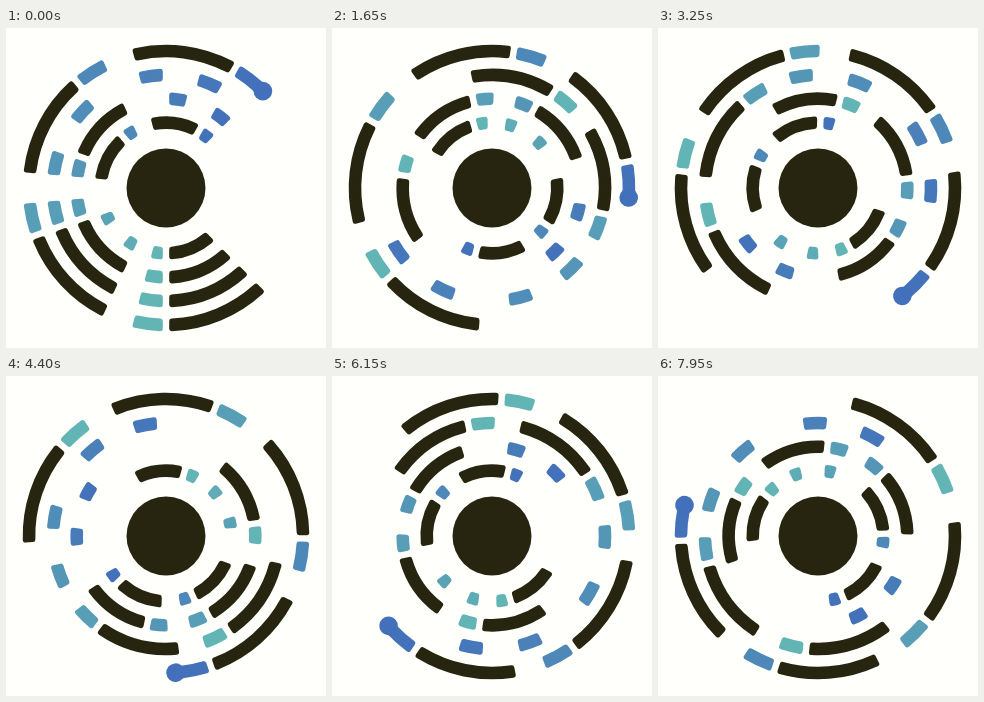
These frames come from a looping animation (320 by 320 pixels, 8000 ms). An HTML page:

```html
<!DOCTYPE html>
<html lang="en">
<head>
<meta charset="utf-8">
<title>Rotating rhythm rings</title>
<style>
  html, body { margin: 0; width: 100%; height: 100%; overflow: hidden; background: #fffffb; }
  svg { display: block; width: 100%; height: 100%; }
</style>
</head>
<body>
<svg id="stage" viewBox="-160 -160 320 320"></svg>
<script>
const LOOP = 8000, STEP = 50;
const UNIT = 15, GAP = 10, START = 135, SWEEP = 270;
const HALF = 6.3, PAD = 3.2, CORNER = 2.6;
const DARK = '#27250f';

// L = three units, S = one unit, "." = empty unit, space = gap between groups
const rings = [
  { r: 137, speed: 30, code: 'LS LS LS LS', head: true },
  { r: 113, speed: -90, code: 'LS LS S.S. S.S.' },
  { r: 89.3, speed: 60, code: 'LS LS SL .S.S' },
  { r: 65.3, speed: -120, code: 'LS S.S. LS LS' }
];

const stage = document.getElementById('stage');

function add(parent, tag, attrs) {
  const el = document.createElementNS('http://www.w3.org/2000/svg', tag);
  for (const key in attrs) el.setAttribute(key, attrs[key]);
  return parent.appendChild(el);
}

// Clockwise degrees from the top, shifted along the arc by some pixels
function point(r, deg, shift = 0) {
  const a = deg * Math.PI / 180 + shift / r;
  return (r * Math.sin(a)).toFixed(2) + ' ' + (-r * Math.cos(a)).toFixed(2);
}

function sector(r, from, to) {
  const inset = PAD + CORNER;
  const outer = r + HALF - CORNER, inner = r - HALF + CORNER;
  return `M${point(outer, from, inset)}A${outer} ${outer} 0 0 1 ${point(outer, to, -inset)}` +
    `L${point(inner, to, -inset)}A${inner} ${inner} 0 0 0 ${point(inner, from, inset)}Z`;
}

// Teal at the tail, blue at the front
function tint(f) {
  return `rgb(${Math.round(106 - 39 * f)},${Math.round(196 - 84 * f)},${Math.round(180 + 6 * f)})`;
}

function build(ring) {
  const g = add(stage, 'g', { 'stroke-width': 2 * CORNER, 'stroke-linejoin': 'round' });
  let at = START;
  for (const c of ring.code) {
    const size = c === ' ' ? GAP : c === 'L' ? 3 * UNIT : UNIT;
    if (c === 'L' || c === 'S') {
      const color = c === 'L' ? DARK : tint((at + size / 2 - START) / SWEEP);
      add(g, 'path', { d: sector(ring.r, at, at + size), fill: color, stroke: color });
    }
    at += size;
  }
  if (ring.head) {
    const [cx, cy] = point(ring.r, at).split(' ');
    add(g, 'circle', { cx, cy, r: 9.3, fill: tint(1) });
  }
  ring.el = g;
}

add(stage, 'circle', { r: 39.5, fill: DARK });
rings.forEach(build);

// Motion is drawn at 30 fps and shown in 50 ms steps
function draw(ms) {
  const shown = Math.floor(ms / STEP) * STEP;
  const t = Math.max(0, Math.ceil(shown * 3 / 100) - 1) / 30;
  for (const { el, speed } of rings) el.setAttribute('transform', `rotate(${speed * t})`);
}

let begin;
function tick(now) {
  if (begin === undefined) begin = now;
  draw((now - begin) % LOOP);
  requestAnimationFrame(tick);
}
draw(0);
requestAnimationFrame(tick);
</script>
</body>
</html>
```
